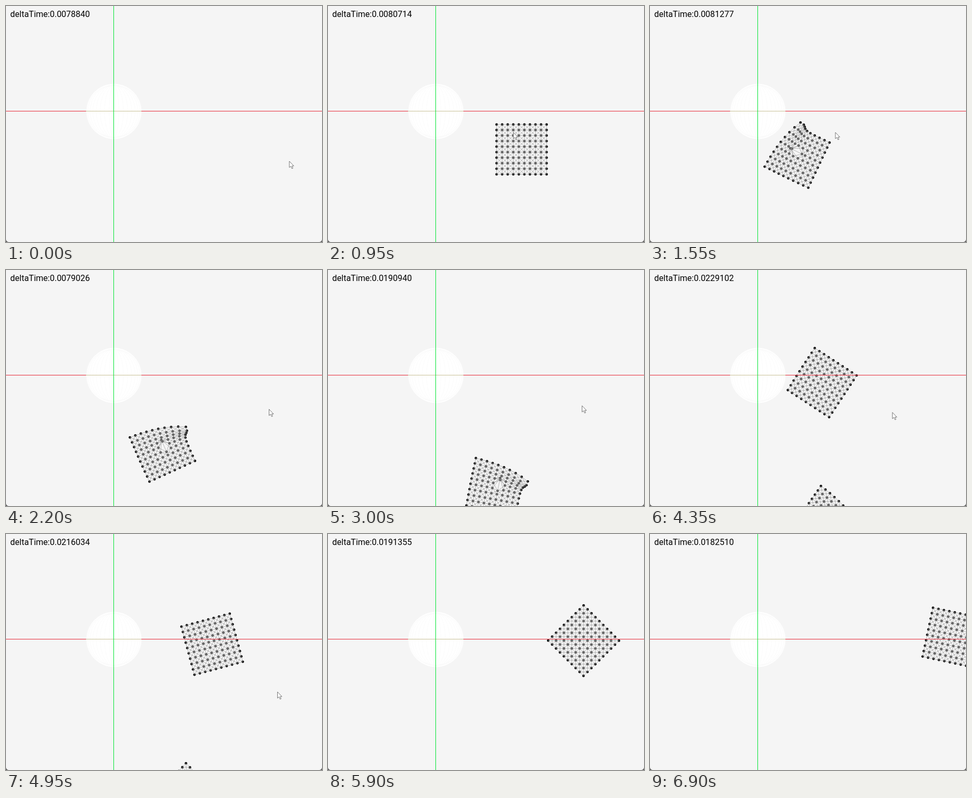
Animation, 600 px wide and 450 px high, one loop 6.95 s. Source, as an HTML page with a canvas:

```html
<!DOCTYPE html>
<html lang="en">
<head>
<meta charset="utf-8">
<title>Soft body</title>
<style>
html, body { margin: 0; width: 100%; height: 100%; overflow: hidden; background: #f5f5f5; }
canvas { position: absolute; left: 0; top: 0; display: block; }
#label {
  position: absolute; left: 8px; top: 6px;
  font: 16px/20px Roboto, "Liberation Sans", sans-serif;
  color: #000; white-space: pre;
}
</style>
</head>
<body>
<canvas id="stage" width="600" height="450"></canvas>
<div id="label"></div>
<script>
const LOOP = 6950, STEP = 50;
const N = 10, GAP = 10.55, HALF = GAP * (N - 1) / 2;
const BALL = { x: 205, y: 201, r: 52.5, contact: 53, soft: 6 };
const ctx = document.getElementById('stage').getContext('2d');
const label = document.getElementById('label');

// A body flies straight in, turns at the ball, then glides off spinning.
const first = {
  born: 0.75, turn: 1.24, x: 269, y: 256, vin: [-340, -60], vout: [28, 88],
  spin: 89, drag: 0, spinDrag: 0.318, fold: 1
};
const second = {
  born: 3.1, turn: 3.9, x: 274.6, y: 218.5, vin: [-350, -133], vout: [237, -17],
  spin: 152, drag: 0.125, spinDrag: 0.125, fold: 0
};

// Pointer stops: seconds, x, y
const pointer = [
  [0.3, 538, 296], [0.95, 352, 241], [1.75, 352, 241], [2.2, 499.5, 265.5],
  [2.5, 534, 270], [3.75, 405, 242], [4.95, 515.5, 301], [5.65, 516, 420]
];

const clamp = v => Math.max(0, Math.min(1, v));
const glide = (v, t, drag) => v * t / (1 + drag * t);

// The simulation runs at half speed once the second body exists.
const simTime = t => t - Math.max(0, t - second.born) / 2;

function pose(b, t) {
  const s = simTime(t) - simTime(b.turn);
  if (s < 0) return [b.x + b.vin[0] * s, b.y + b.vin[1] * s, 0];
  return [
    b.x + glide(b.vout[0], s, b.drag),
    b.y + glide(b.vout[1], s, b.drag),
    glide(b.spin, s, b.spinDrag) * Math.PI / 180
  ];
}

// Lasting fold at the struck corner, with a hole beside it
function crumple(i, j, amount) {
  const fold = 31 * amount * Math.exp(-j / 4 - i * i / 9);
  const dx = i - 4.3, dy = j - 4, r = Math.hypot(dx, dy);
  const hole = 15 * amount * Math.exp(-3 * r * r) / r;
  return [0.93 * fold + dx * hole, -0.36 * fold + dy * hole];
}

function pushOut(x, y) {
  const dx = x - BALL.x, dy = y - BALL.y, d = Math.hypot(dx, dy) || 1;
  const push = BALL.soft * Math.log(1 + Math.exp((BALL.contact - d) / BALL.soft));
  return [x + dx / d * push, y + dy / d * push];
}

function eachNode(draw) {
  for (let j = 0; j < N; j++) for (let i = 0; i < N; i++) draw(i, j, j * N + i);
}

function drawBody(b, t) {
  if (t < b.born) return;
  const [cx, cy, angle] = pose(b, t);
  const c = Math.cos(angle), s = Math.sin(angle);
  const folded = b.fold * clamp((t - b.turn) / 0.1 + 1);
  const at = [];
  eachNode((i, j) => {
    const [du, dv] = crumple(i, j, folded);
    const u = i * GAP - HALF + du, v = j * GAP - HALF + dv;
    at.push(pushOut(cx + u * c - v * s, cy + u * s + v * c));
  });

  eachNode((i, j, n) => {
    const inner = i % (N - 1) && j % (N - 1);
    ctx.fillStyle = inner ? '#484848' : '#0c0c0c';
    ctx.beginPath();
    ctx.arc(...at[n], 2.45, 0, 7);
    ctx.fill();
  });

  ctx.strokeStyle = 'rgba(128,128,128,.85)';
  ctx.lineWidth = 0.65;
  ctx.beginPath();
  eachNode((i, j, n) => {
    for (const [di, dj] of [[1, 0], [0, 1], [1, 1], [-1, 1]]) {
      const p = i + di, q = j + dj;
      if (p < 0 || p >= N || q >= N) continue;
      ctx.moveTo(...at[n]);
      ctx.lineTo(...at[q * N + p]);
    }
  });
  ctx.stroke();
}

function drawBall() {
  ctx.fillStyle = '#fff';
  ctx.beginPath();
  ctx.arc(BALL.x, BALL.y, BALL.r, 0, 7);
  ctx.fill();
  ctx.strokeStyle = '#fafafa';
  ctx.lineWidth = 0.7;
  for (let k = 1; k < 9; k++) {
    ctx.beginPath();
    ctx.ellipse(BALL.x, BALL.y, BALL.r * Math.sin(k * Math.PI / 18), 50, 0, 0, 7);
    ctx.stroke();
  }
}

function drawAxes() {
  ctx.fillStyle = '#e62937';
  ctx.fillRect(0, 200, 600, 1);
  ctx.fillStyle = '#c9c198';
  ctx.fillRect(152, 200, 105, 1);
  ctx.fillStyle = '#00e430';
  ctx.fillRect(204, 0, 1, 450);
}

function drawPointer(t) {
  const next = pointer.findIndex(p => p[0] > t);
  if (next < 0) return;
  const a = pointer[Math.max(0, next - 1)], b = pointer[next];
  const f = clamp((t - a[0]) / (b[0] - a[0] || 1));
  ctx.save();
  ctx.translate(a[1] + (b[1] - a[1]) * f, a[2] + (b[2] - a[2]) * f);
  ctx.fillStyle = '#fff';
  ctx.strokeStyle = '#555';
  ctx.lineWidth = 0.8;
  const arrow = new Path2D('M0 0V12L2.8 9.5 4.9 14 6.8 13.2 4.9 9H8.5Z');
  ctx.fill(arrow);
  ctx.stroke(arrow);
  ctx.restore();
}

function drawCorners() {
  ctx.fillStyle = '#555';
  ctx.fill(new Path2D('M0 445Q.5 449.5 5 450H0ZM600 445Q599.5 449.5 595 450H600Z'));
}

// Seeded frame cost, higher once the bodies multiply
function deltaTime(n, t) {
  const r = Math.sin(n * 12.9898 + 4.1) * 43758.5453;
  const noise = r - Math.floor(r);
  return t < 2.75 ? 0.0075 + 0.001 * noise : 0.0175 + 0.008 * noise;
}

let shown = -1;
function frame(now) {
  const n = Math.floor((now % LOOP) / STEP);
  if (n !== shown) {
    shown = n;
    const t = n * STEP / 1000;
    ctx.fillStyle = '#f5f5f5';
    ctx.fillRect(0, 0, 600, 450);
    drawBall();
    drawBody(first, t);
    drawBody(second, t);
    drawAxes();
    drawPointer(t);
    drawCorners();
    label.textContent = 'deltaTime:' + deltaTime(n, t).toFixed(7);
  }
  requestAnimationFrame(() => frame(performance.now() - start));
}
const start = performance.now();
frame(0);
</script>
</body>
</html>
```
